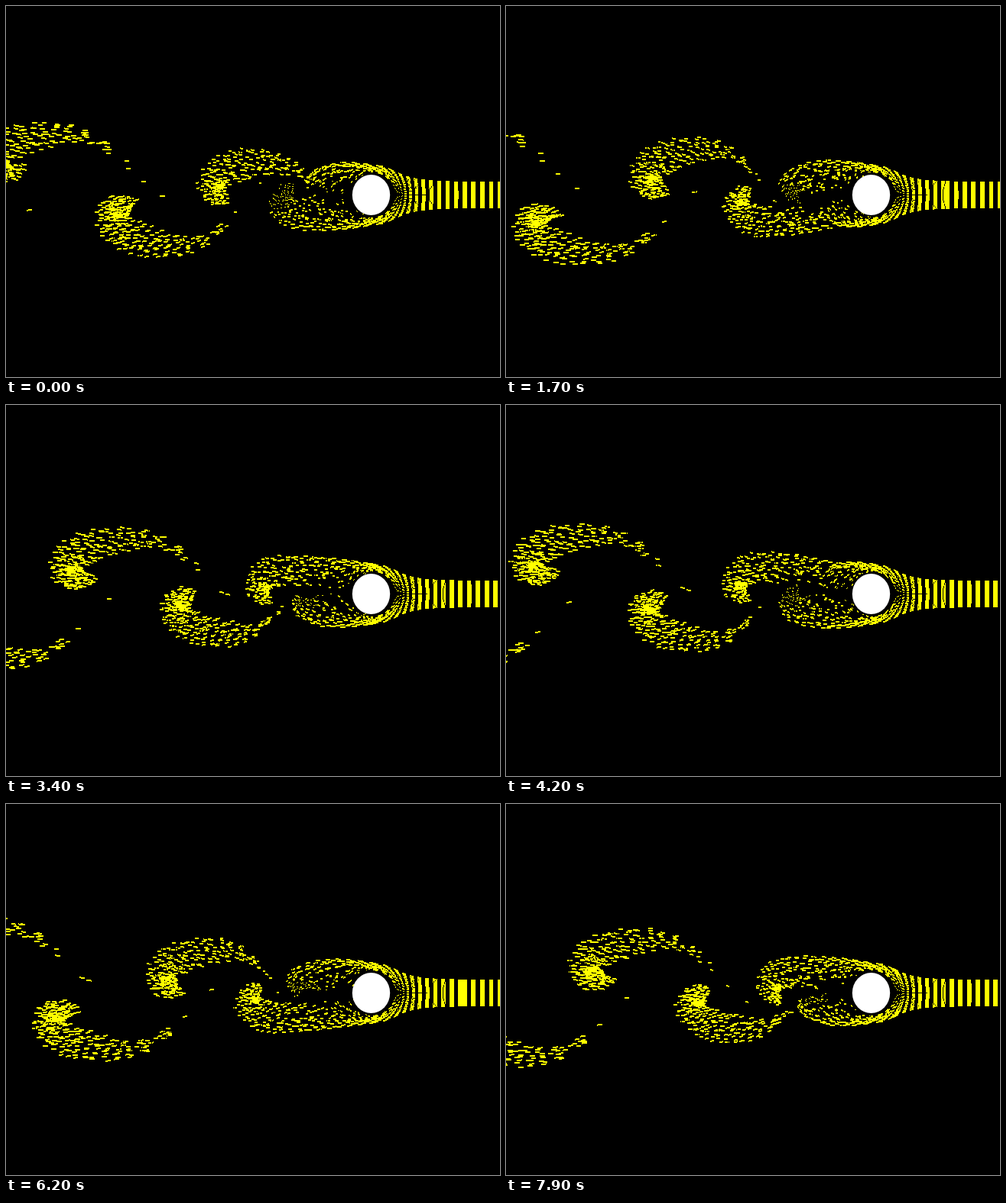
Animation, 646 px wide and 486 px high, one loop 8 s. Source, as an HTML page with a canvas:

```html
<!DOCTYPE html>
<html lang="en">
<head>
<meta charset="utf-8">
<title>Vortex street</title>
<style>
html, body { margin: 0; width: 100%; height: 100%; overflow: hidden; background: #000; }
canvas { display: block; }
</style>
</head>
<body>
<canvas id="stage" width="646" height="486"></canvas>
<script>
const ctx = document.getElementById('stage').getContext('2d');
const CX = 478, CY = 247.5;          // cylinder centre
const LOOP = 8000, STEP = 100;       // ms
const SHED = 4.9;                    // seconds per shedding cycle
const COLS = 25;                     // columns released per cycle
const LIFE = 18;                     // seconds
const ROWS = 10, HALF = 17;          // rows per side, half height of the inflow
const U = 60.5, R = 30, DT = 0.01;   // inflow around the cylinder

// Clump shape: backbone u, v and half width, from the curled head to the thin tail
const SHAPE = [
  [44, 38, 8], [52, 30, 12], [49, 17, 13], [34, 14, 14], [22, 18, 15], [18, 30, 17],
  [27, 43, 19], [42, 51, 21], [60, 57, 21], [80, 62, 18], [102, 65, 15], [124, 64, 11],
  [148, 56, 7], [174, 34, 4], [225, -22, 3], [255, -55, 3]
];
const SHAPE_H = 78;

// Clump drift: age, left edge, inner and outer height above the axis
const DRIFT = [
  [-6, 395, -15, 42], [-3.6, 365, -15, 46], [-2.3, 341, -17, 52], [-0.7, 278, -12, 58],
  [0, 247, -14, 61], [1.7, 158, -5, 74], [2.45, 113, 0, 80], [4.2, 2, 12, 90], [9, -312, 38, 112]
];

const mix = (a, b, k) => a + (b - a) * k;
const clamp = (x, a, b) => Math.min(b, Math.max(a, x));
const smooth = x => { x = clamp(x, 0, 1); return x * x * (3 - 2 * x); };
const rand = (a, b) => {
  const n = Math.sin(a * 12.9898 + b * 78.233) * 43758.5453;
  return (n - Math.floor(n)) * 2 - 1;
};

function drift(age) {
  let i = 1;
  while (i < DRIFT.length - 1 && age > DRIFT[i][0]) i++;
  const a = DRIFT[i - 1], b = DRIFT[i];
  const k = Math.max(0, (age - a[0]) / (b[0] - a[0]));
  return [1, 2, 3].map(c => mix(a[c], b[c], k));
}

// Catmull-Rom along the backbone
function backbone(s) {
  const f = clamp(s * 12 + 2, 0, SHAPE.length - 1.001);
  const i = Math.floor(f), k = f - i;
  const at = n => SHAPE[clamp(n, 0, SHAPE.length - 1)];
  const p = at(i - 1), q = at(i), r = at(i + 1), z = at(i + 2);
  return [0, 1, 2].map(c => q[c] + 0.5 * k * (r[c] - p[c]
    + k * (2 * p[c] - 5 * q[c] + 4 * r[c] - z[c]
    + k * (3 * (q[c] - r[c]) + z[c] - p[c]))));
}

function inflowSpeed(x, y, rho) {
  const r2 = x * x + y * y, m = R * R / (r2 * r2);
  const drag = 1 - 0.5 * (1 - rho) * Math.exp(-Math.max(0, Math.sqrt(r2) - R) / 12);
  return [-U * drag * (1 - m * (x * x - y * y)), U * drag * 2 * m * x * y];
}

// Steady path of one row from the right edge to the shoulder
function inflowPath(row) {
  const rho = (row + 0.5) / ROWS, path = [];
  let x = 655 - CX, y = HALF * rho;
  while (x > 0) {
    path.push([x, y]);
    const [a, b] = inflowSpeed(x, y, rho);
    const [u, v] = inflowSpeed(x + a * DT / 2, y + b * DT / 2, rho);
    x += u * DT;
    y += v * DT;
  }
  path.push([x, y]);
  return path;
}
const paths = Array.from({ length: ROWS }, (_, row) => inflowPath(row));

// Columns start on whole steps, so one interval per cycle is short
const release = col => (3 + Math.ceil(col * SHED * 10 / COLS - 1e-6)) / 10;

// Separated layer behind the shoulder; e is the time since passing it
function layer(e, rho, y0, jx, jy) {
  const loose = 16 * (1 - rho) * Math.min(e / 2, 1);
  const inner = 5 + (y0 - 5) * Math.exp(-((e / 1.5) ** 2));
  const outer = y0 + 9 * (1 - Math.exp(-2 * e));
  const x = -mix(13, 58, rho ** 0.8) * e - 8 * rho * (1 - Math.exp(-e / 0.3));
  return [x + loose * jx, mix(inner, outer, rho ** 0.7) + loose * jy];
}

function clump(age, phase, rho, jx, jy) {
  const [left, low, high] = drift(age);
  let s = 1 - (1 - phase) ** 0.62;   // thins out towards the tail
  s += 0.012 * jx - 0.018 * (age - 2.45) * (1 - s);
  const [u, v, w] = backbone(s);
  const a = backbone(s - 0.03), b = backbone(s + 0.03);
  const dx = b[0] - a[0], dy = b[1] - a[1], len = Math.hypot(dx, dy) || 1;
  const off = w * (2 * rho - 1 + 0.12 * jy);
  let px = u - dy / len * off;
  const py = v + dx / len * off;
  px -= clamp(0.28 * (1 - age / 2.45), -0.1, 0.5) * px * px / 225;
  return [left + px - CX, low + py * (high - low) / SHAPE_H];
}

// Place of a particle relative to the cylinder, y pointing outwards
function place(side, row, col, t) {
  const path = paths[row], born = release(col);
  const life = Math.max(0, t - born), travel = (path.length - 1) * DT;
  if (life < travel) {
    const f = life / DT, i = Math.min(Math.floor(f), path.length - 2);
    return [0, 1].map(c => mix(path[i][c], path[i + 1][c], f - i));
  }
  const rho = (row + 0.5) / ROWS, e = life - travel;
  const jx = rand(col, row * side + 0.3), jy = rand(col + 0.7, row * side);
  const shift = side > 0 ? 0 : SHED / 2;
  // Inner rows linger behind the cylinder, so they join a clump later
  const firstAge = mix(-8.2, -6.3, rho ** 0.7);
  const f = (born + travel + shift - firstAge) / SHED, cycle = Math.floor(f);
  const p = layer(e, rho, path[path.length - 1][1], jx, jy);
  const q = clump(t + shift - cycle * SHED, f - cycle, rho, jx, jy);
  const k = smooth(e / mix(6, 3.3, rho));
  return [mix(p[0], q[0], k), mix(p[1], q[1], k)];
}

// Hard-edged dash
function dash(x0, y0, x1, y1) {
  const dx = x1 - x0, dy = y1 - y0;
  const n = Math.max(2, Math.round(Math.max(Math.abs(dx), Math.abs(dy))));
  const thick = Math.hypot(dx, dy) < 2.5 ? 1 : 2;
  const flat = Math.abs(dx) >= Math.abs(dy);
  for (let i = 0; i < n; i++) {
    ctx.fillRect(Math.round(x1 - dx * i / n), Math.round(y1 - dy * i / n),
      flat ? 1 : thick, flat ? thick : 1);
  }
}

function draw(t) {
  ctx.fillStyle = '#000';
  ctx.fillRect(0, 0, 646, 486);
  ctx.fillStyle = '#ff0';
  const last = Math.floor(t * COLS / SHED);
  for (let col = last - Math.ceil(LIFE * COLS / SHED); col <= last; col++) {
    for (let row = 0; row < ROWS; row++) {
      for (const side of [1, -1]) {
        const b = place(side, row, col, t);
        if (b[0] < -CX - 12) continue;
        const a = place(side, row, col, t - STEP / 1000);
        dash(CX + a[0], CY - side * a[1] - 1, CX + b[0], CY - side * b[1] - 1);
      }
    }
  }
  ctx.fillStyle = '#fff';
  ctx.beginPath();
  ctx.ellipse(477.5, 247.5, 24.7, 26.5, 0, 0, Math.PI * 2);
  ctx.fill();
}

let shown = -1;
function tick() {
  const step = Math.floor(performance.now() % LOOP / STEP);
  if (step !== shown) draw((shown = step) * STEP / 1000);
  requestAnimationFrame(tick);
}
tick();
</script>
</body>
</html>
```
